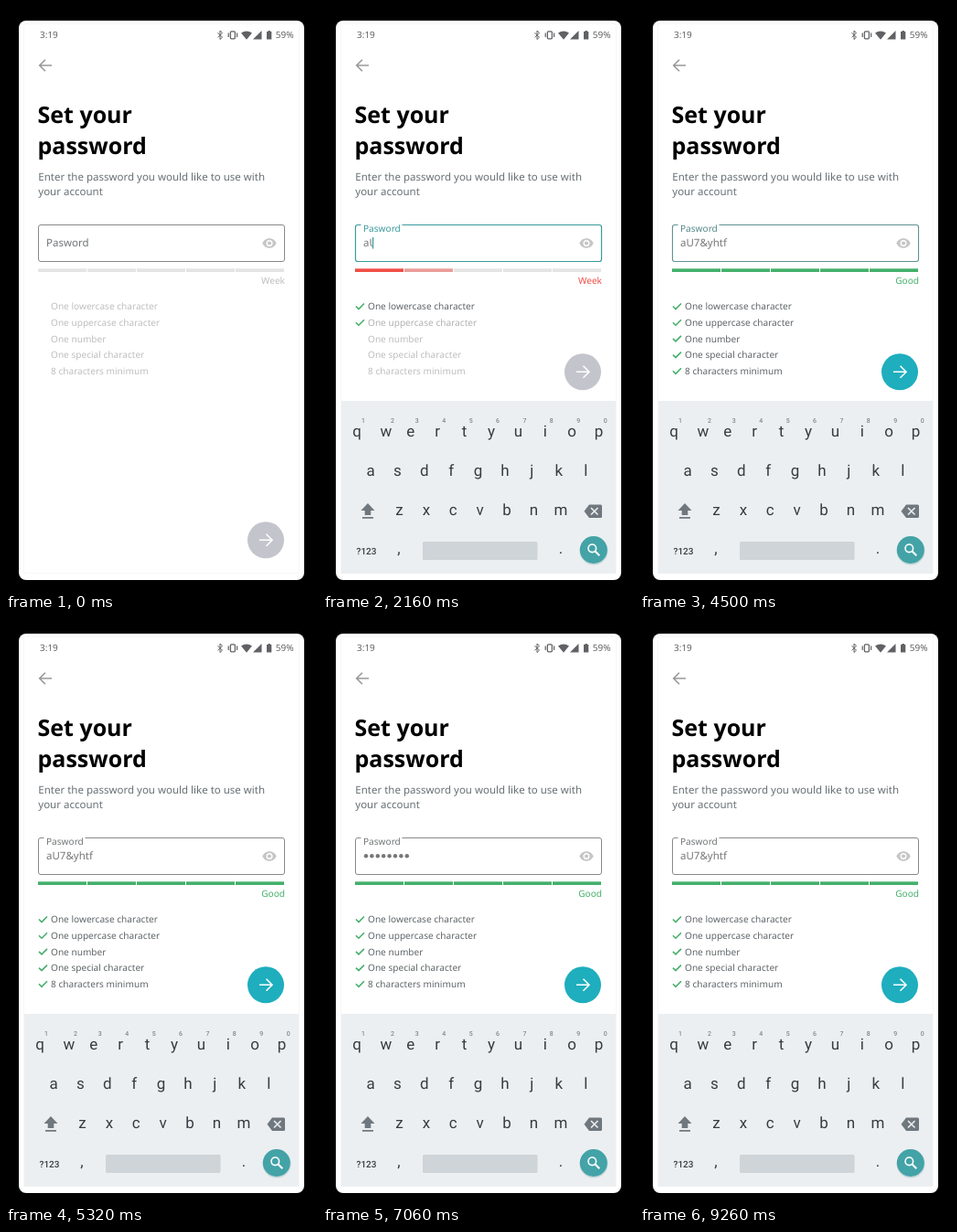
Write an HTML page that moves like this. It is 340 px wide and 640 px high and loops after 9280 ms.

```html
<!DOCTYPE html>
<html lang="en">
<head>
<meta charset="utf-8">
<title>Set your password</title>
<style>
  html, body { margin: 0; width: 100%; height: 100%; overflow: hidden; background: #000; }
  svg { display: block; width: 340px; height: 640px; }
  text { font-family: "Noto Sans", "Open Sans", sans-serif; text-rendering: geometricPrecision; }
  .title { font-size: 25px; font-weight: 700; }
  .body { font-size: 11.5px; fill: #687074; }
  .small { font-size: 10.1px; }
  .status, .keys text { font-family: Roboto, sans-serif; }
  .status { font-size: 10px; font-weight: 500; fill: #606164; }
  .keys text { font-size: 17px; fill: #363c42; text-anchor: middle; }
  .keys .hint { font-size: 7px; fill: #676d73; }
  .keys .mode { font-size: 10px; font-weight: 500; }
  .line { fill: none; stroke-width: 1.6; }
</style>
</head>
<body>
<svg viewBox="0 0 340 640">
  <defs>
    <clipPath id="screen"><rect x="20" y="20" width="300" height="601"/></clipPath>
    <clipPath id="typed"><rect id="typedArea" x="42" y="245" width="0" height="30"/></clipPath>
  </defs>
  <rect width="340" height="640"/>
  <rect x="14" y="16" width="312" height="612" rx="8" fill="#fff"/>
  <rect x="19.5" y="19.5" width="301" height="601" fill="none" stroke="#f7f7f7"/>

  <g class="status">
    <text x="37" y="35.3">3:19</text>
    <text x="294.8" y="35.3">59%</text>
    <path d="M231.5 29.2 236.5 34.2 234 36.6V27L236.5 29.4 231.5 34.4" fill="none" stroke="#606164"/>
    <rect x="245.4" y="27.8" width="5" height="8" rx="1" fill="none" stroke="#606164" stroke-width="1.3"/>
    <path d="M243.2 29.5v4.6M252.6 29.5v4.6" stroke="#606164" stroke-width="1.2"/>
    <path d="M257 29.5Q263 25.5 269 29.5L263 36.7ZM270 36.5H279.5V27ZM285 28h1.5v-1h2.4v1h1.4v8.6H285Z"/>
  </g>
  <path class="line" stroke="#999" d="M50 65H37M43 58.7 36.7 65 43 71.3"/>

  <text class="title" x="34.5" y="127.5">Set your</text>
  <text class="title" x="34.5" y="161.5">password</text>
  <text class="body" x="35.3" y="191">Enter the password you would like to use with</text>
  <text class="body" x="35.3" y="207">your account</text>

  <rect id="field" x="35.5" y="239.5" width="269" height="40" rx="2.5" fill="none"/>
  <rect id="notch" y="237" height="5" fill="#fff"/>
  <text id="label" x="44">Pasword</text>
  <g clip-path="url(#typed)">
    <text id="secret" class="body" x="44" y="263" style="fill:#777">aU7&amp;yhtf</text>
    <g id="dots" fill="#777"></g>
  </g>
  <rect id="caret" y="253" width="1.3" height="12.5" fill="#3b9a9c"/>
  <path transform="translate(279.6 251.1) scale(.7)" fill="#c6c6c6" fill-rule="evenodd" d="M12 4.5C7 4.500 2.730 7.610 1 12c1.730 4.390 6 7.500 11 7.500s9.270-3.110 11-7.500C21.270 7.610 17 4.500 12 4.500ZM12 17a5 5 0 1 1 0-10a5 5 0 0 1 0 10ZM12 9a3 3 0 1 0 0 6a3 3 0 0 0 0-6Z"/>
  <g id="bars"></g>
  <text id="strength" class="small" x="305" y="304" text-anchor="end">Week</text>
  <g id="rules"></g>

  <g clip-path="url(#screen)">
    <g id="button">
      <circle id="disc" cx="284" cy="400.300" r="20"/>
      <path class="line" stroke="#fff" d="M277 400.300H290.500M284.500 393.800 291 400.300 284.500 406.800"/>
    </g>
    <g id="keyboard" class="keys">
      <rect x="20" y="432" width="300" height="190" fill="#eceff1"/>
      <g id="letters"></g>
      <path fill="#70787f" d="M49 544 56.500 552H52.300V557H45.700V552H41.500ZM43 559H55V560.700H43Z"/>
      <path fill="#70787f" d="M291 545.500H303.500Q305 545.500 305 547V558.500Q305 560 303.500 560H291L285.500 552.700Z"/>
      <path class="line" stroke="#eceff1" d="M293 549 300.500 556.500M300.500 549 293 556.500"/>
      <text class="mode" x="47.500" y="599.500">?123</text>
      <text x="83" y="599">,</text>
      <rect x="109" y="586" width="125.500" height="20" rx="1.500" fill="#ced4d8"/>
      <text x="260" y="599">.</text>
      <circle cx="296" cy="596" r="15.500" fill="#c6d7da"/>
      <circle cx="295.800" cy="595" r="15" fill="#43a3a7"/>
      <circle class="line" cx="294.300" cy="593.300" r="4.300" stroke="#fff"/>
      <path class="line" stroke="#fff" style="stroke-width:2" d="M297.500 596.500 302.300 601.300"/>
    </g>
  </g>
  <circle id="touch" fill="#000" fill-opacity=".045" stroke="#bbb" stroke-width=".8"/>
</svg>
<script>
const LOOP = 9280;
const $ = id => document.getElementById(id);
const set = (el, attrs) => {
  for (const k in attrs) el.setAttribute(k, attrs[k]);
  return el;
};
const add = (parent, tag, attrs, text = '') => {
  const el = set(document.createElementNS('http://www.w3.org/2000/svg', tag), attrs);
  el.textContent = text;
  return parent.appendChild(el);
};
const ramp = (t, from, to) => Math.min(1, Math.max(0, (t - from) / (to - from)));
const ease = p => p < .5 ? 4 * p ** 3 : 1 - 4 * (1 - p) ** 3;
const pulse = (t, a, b, c, d) => ramp(t, a, b) * (1 - ramp(t, c, d));
const lerp = (a, b, p) => a + (b - a) * p;
const mix = (a, b, p) =>
  `rgb(${a.map((v, i) => Math.round(lerp(v, b[i], p))).join()})`;

const GREY = [136, 136, 136], TEAL = [59, 154, 156], TRACK = [228, 228, 228];
const MUTED = [190, 190, 190], INK = [95, 100, 104];
const RED = [240, 78, 70], AMBER = [245, 167, 66], GREEN = [69, 176, 107];
const OFF = [196, 196, 204], ON = [30, 174, 190];

const rules = [
  ['One lowercase character', 1920],
  ['One uppercase character', 2090],
  ['One number', 2420],
  ['One special character', 2670],
  ['8 characters minimum', 3440]
].map(([text, at], i) => {
  const y = 328.5 + i * 17.7;
  return {
    at,
    bar: add($('bars'), 'rect', { x: 35 + i * 54, y: 287.3, width: 53, height: 3.7 }),
    check: add($('rules'), 'path', { class: 'line', stroke: mix(GREEN, GREEN, 0), d: `M36 ${y}l3 3 6-6` }),
    text: add($('rules'), 'text', { class: 'small', x: 49, y: y + 3.7 }, text)
  };
});

for (let i = 0; i < 8; i++) add($('dots'), 'circle', { cx: 47 + i * 6.4, cy: 259.3, r: 2.2 });

[['qwertyuiop', 37, 471], ['asdfghjkl', 52, 514], ['zxcvbnm', 83.5, 557]].forEach(([row, x0, y], r) => {
  [...row].forEach((key, i) => {
    const x = x0 + i * 29.4 + (r === 0 && i === 1 ? 2.5 : 0);
    add($('letters'), 'text', { x, y }, key);
    if (r === 0) add($('letters'), 'text', { x: x + 7, y: 455.5, class: 'hint' }, (i + 1) % 10);
  });
});

function strengthColor(t) {
  if (t < 2670) return RED;
  return t < 3440 ? AMBER : GREEN;
}

function draw(t) {
  const float = ease(ramp(t, 1120, 1320));
  const focus = ramp(t, 1120, 1320) * (1 - ramp(t, 4300, 4700));
  const lift = ease(ramp(t, 1300, 1650));
  const typing = ramp(t, 1850, 3530);

  set($('field'), { stroke: mix(GREY, TEAL, focus), 'stroke-width': 1 + .2 * focus });
  set($('notch'), { x: lerp(64, 41.5, float), width: 45 * float });
  set($('label'), {
    y: lerp(263, 247, float),
    'font-size': lerp(11.5, 10.1, float),
    fill: mix([112, 116, 118], TEAL, focus)
  });

  set($('typedArea'), { width: 2 + 53 * typing });
  set($('caret'), { x: 44.4 + 51.5 * typing, opacity: pulse(t, 1250, 1350, 4200, 4350) });
  const hidden = t >= 6240 && t < 7860;
  set($('secret'), { opacity: hidden ? 0 : 1 });
  set($('dots'), { opacity: hidden ? 1 : 0 });

  const color = strengthColor(t);
  for (const { at, bar, check, text } of rules) {
    set(bar, { fill: mix(TRACK, color, ramp(t, at, at + 150)) });
    set(check, { opacity: ramp(t, at - 30, at + 50) });
    set(text, { fill: mix(MUTED, INK, ramp(t, at + 50, at + 200)) });
  }
  $('strength').textContent = t < 3480 ? 'Week' : 'Good';
  set($('strength'), { fill: mix(MUTED, color, ramp(t, 1920, 2070)) });

  set($('button'), { transform: `translate(0 ${184 * (1 - lift)})` });
  set($('keyboard'), { transform: `translate(0 ${190 * (1 - lift)})` });
  set($('disc'), { fill: mix(OFF, ON, ramp(t, 3500, 3700)) });

  const tapField = pulse(t, 930, 1080, 1560, 1720);
  const tapEye = pulse(t, 6000, 6120, 6330, 6480) + pulse(t, 7720, 7840, 8030, 8180);
  const tap = tapField + tapEye;
  set($('touch'), {
    cx: t < 3000 ? 116 : 283.7,
    cy: t < 3000 ? 268 : 261.7,
    r: lerp(12, 16.5, tap),
    opacity: tap
  });
}

const start = performance.now();
function frame() {
  draw((performance.now() - start) % LOOP);
  requestAnimationFrame(frame);
}
frame();
</script>
</body>
</html>
```
